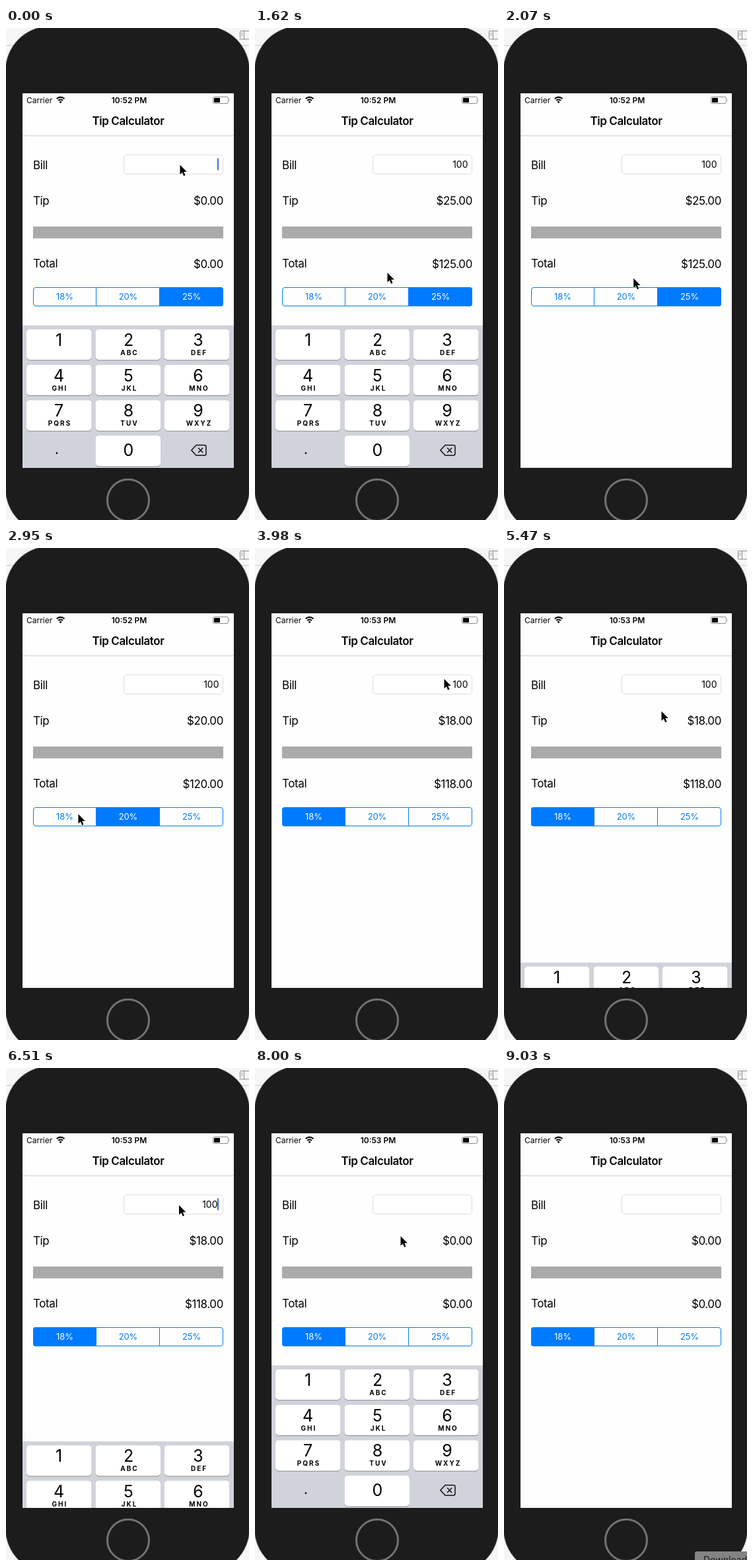
An HTML page for the animation above (9130 ms loop, 368 px wide and 746 px high).

```html
<!DOCTYPE html>
<html lang="en">
<head>
<meta charset="utf-8">
<title>Tip Calculator</title>
<style>
  html, body { margin: 0; width: 368px; height: 746px; overflow: hidden; background: #f6f6f6; }
  svg { display: block; }
  text { font-family: Inter, Roboto, sans-serif; }
  .body { font-size: 17px; letter-spacing: -.4px; }
  .end { text-anchor: end; }
  .mid { text-anchor: middle; }
  .bold { font-weight: 600; }
  .small { font-size: 12px; }
  .digit { font-size: 25px; }
  .letters { font-size: 10px; font-weight: 700; letter-spacing: 2px; }
  .line { fill: none; stroke: #111; stroke-width: 1.5; stroke-linejoin: round; stroke-linecap: round; }
</style>
</head>
<body>
<svg width="368" height="746" viewBox="0 0 368 746">
  <clipPath id="screen"><rect x="25" y="99" width="320" height="568"/></clipPath>
  <clipPath id="pill"><rect x="41" y="393" width="288" height="29" rx="4"/></clipPath>

  <path d="M0 26.5H368" stroke="#ccc"/>
  <g fill="none" stroke="#8a8a8a">
    <rect x="354.500" y="4.500" width="16" height="12.500" rx="1.500"/>
    <path d="M360.500 5V17M356.500 7.500h2M356.500 9.500h2M356.500 11.500h2"/>
  </g>
  <rect x="-1" y="-3" width="370" height="769" rx="68" fill="#1c1c1c" stroke="#aaa" stroke-width=".8"/>
  <circle cx="185" cy="716" r="31.500" fill="none" stroke="#737373" stroke-width="3"/>

  <g clip-path="url(#screen)">
    <rect x="25" y="99" width="320" height="568" fill="#fefefe"/>
    <text class="small" x="31" y="113.500">Carrier</text>
    <g fill="none" stroke="#000" stroke-width="2.200">
      <path d="M76.800 107.300a8.200 8.200 0 0 1 11.600 0M79.200 110a4.900 4.900 0 0 1 6.800 0"/>
    </g>
    <path d="M82.600 114.300l-2.100-2.200a3 3 0 0 1 4.200 0z"/>
    <text class="small bold mid" id="clock" x="186.500" y="113.500"></text>
    <rect x="313.500" y="104.500" width="23" height="10" rx="2" fill="none" stroke="#888"/>
    <rect x="315" y="106" width="9" height="7" rx=".5"/>
    <path d="M338 107.800q1.500 1.700 0 3.600z" fill="#888"/>
    <text class="body bold mid" x="185" y="147">Tip Calculator</text>
    <path d="M25 163.500H345" stroke="#cfcfcf"/>

    <text class="body" x="41" y="213.500">Bill</text>
    <text class="body" x="41" y="267.500">Tip</text>
    <text class="body" x="41" y="362.500">Total</text>
    <rect x="178.500" y="192.500" width="150" height="29" rx="4.500" fill="#fff" stroke="#dedede"/>
    <text class="end" id="bill" y="212" font-size="14"></text>
    <rect id="caret" x="320" y="197.500" width="2" height="18" fill="#4269e6"/>
    <text class="body end" id="tip" x="329" y="267.500"></text>
    <text class="body end" id="total" x="329" y="363.500"></text>
    <rect x="41" y="301" width="288" height="18" fill="#aaa"/>

    <rect id="choice" y="393" width="96" height="29" fill="#007aff" clip-path="url(#pill)"/>
    <rect x="41.500" y="393.500" width="287" height="28" rx="3.500" fill="none" stroke="#007aff"/>
    <path d="M136.500 393V422M232.500 393V422" stroke="#007aff"/>
    <g id="rates" class="mid" font-size="13" letter-spacing="-.1"></g>

    <g id="keyboard"><rect x="25" y="451" width="320" height="217" fill="#d0d3da"/></g>
  </g>

  <g id="tooltip">
    <rect x="289" y="733" width="90" height="24" rx="3" fill="#838383"/>
    <text x="302" y="750.500" font-size="14" fill="#1c1c1c">Downloads</text>
  </g>
  <path id="pointer" d="M0 0V14.500L3.400 11.400L5.700 16.700L8 15.700L5.800 10.500H10.300Z"
        stroke="#fff" stroke-width="1.200" paint-order="stroke"/>
</svg>
<script>
const LOOP = 9130, STEP = 148, LEAD = 17;   // the screen refreshes once per STEP
const $ = id => document.getElementById(id);

// Each row is [step, value...]; steps are screen refreshes.
const bills = [[0, ''], [2, '10'], [3, '100'], [45, '10'], [46, '1'], [49, '']];
const choices = [[0, 2], [17, 1], [22, 0]];
const editing = [[0, true], [11, false], [31, true], [35, false], [44, true], [54, false]];
const keyboardUp = [[-9, true], [11.4, false], [30.6, true], [36, false], [43.5, true], [54.4, false]];
const path = [
  [5, 263.5, 207.5], [11, 200.5, 371], [13, 200.5, 371], [16, 184, 404], [18, 184, 404],
  [20, 109.5, 403.5], [21, 95, 406], [22, 95, 406], [26, 301, 166], [27, 286.5, 198.5],
  [31, 286.5, 198.5], [35, 238.5, 247.5], [37, 238.5, 247.5], [40, 262, 208], [51, 262, 208],
  [54, 220.5, 255], [55, 220.5, 255], [59, 373, 752]
];
const rates = [18, 20, 25];

const rowAt = (rows, step) => rows.findLast(row => row[0] <= step) || rows[0];
const valueAt = (rows, step) => rowAt(rows, step)[1];
const money = value => '$' + value.toFixed(2);

function pointerAt(step) {
  const from = rowAt(path, step);
  const to = path[path.indexOf(from) + 1] || from;
  const p = Math.max(0, (step - from[0]) / (to[0] - from[0] || 1));
  const eased = p * p * (3 - 2 * p);
  return [1, 2].map(i => from[i] + (to[i] - from[i]) * eased);
}

// Critically damped spring between shown (0) and hidden (216).
function keyboardOffset(step) {
  const [start, up] = rowAt(keyboardUp, step);
  const u = 3.15 * (step - start);
  const rest = (1 + u) * Math.exp(-u);
  return 216 * (up ? rest : 1 - rest);
}

function buildKeyboard() {
  const letters = ['', 'ABC', 'DEF', 'GHI', 'JKL', 'MNO', 'PQRS', 'TUV', 'WXYZ'];
  const key = (label, sub, col, row) => {
    const x = 31 + 104.5 * col, y = 457 + 53.7 * row, cx = 80 + 105.5 * col;
    return `<rect x="${x}" y="${y + 1}" width="98.5" height="46.3" rx="5" fill="#898b90"/>
      <rect x="${x}" y="${y}" width="98.5" height="46.3" rx="5" fill="#fff"/>
      <text class="digit mid" x="${cx}" y="${y + (label ? 25 : 31)}">${label}</text>
      <text class="letters mid" x="${cx + 1.5}" y="${y + 39}">${sub}</text>`;
  };
  $('keyboard').innerHTML += letters.map((sub, i) => key(i + 1, sub, i % 3, Math.floor(i / 3))).join('')
    + key(0, '', 1, 3)
    + `<text class="mid" x="77" y="646" font-size="22">.</text>
      <path class="line" d="M288 632.500H300.500Q303 632.500 303 635V645.500Q303 648 300.500 648H288L280.800 640.200Z
        M291.500 637l6.300 6.500M297.800 637l-6.300 6.500"/>`;
}

function draw(now) {
  const step = Math.floor((now % LOOP + LEAD) / STEP);
  const bill = valueAt(bills, step), choice = valueAt(choices, step), active = valueAt(editing, step);
  const tip = bill * rates[choice] / 100;
  $('clock').textContent = `10:${step < 24 ? 52 : 53} PM`;
  $('bill').textContent = bill;
  $('bill').setAttribute('x', active ? 320.5 : 322.5);
  $('caret').style.display = active ? '' : 'none';
  $('tip').textContent = money(tip);
  $('total').textContent = money(+bill + tip);
  $('choice').setAttribute('x', 41 + 96 * choice);
  [...$('rates').children].forEach((label, i) => label.setAttribute('fill', i === choice ? '#fff' : '#007aff'));
  $('keyboard').setAttribute('transform', `translate(0 ${keyboardOffset(step)})`);
  $('pointer').setAttribute('transform', `translate(${pointerAt(step)})`);
  $('tooltip').style.display = step >= 61 ? '' : 'none';
}

$('rates').innerHTML = rates.map((rate, i) => `<text x="${89 + 96 * i}" y="412.2">${rate}%</text>`).join('');
buildKeyboard();
const start = performance.now();
(function tick() {
  draw(performance.now() - start);
  requestAnimationFrame(tick);
})();
</script>
</body>
</html>
```
